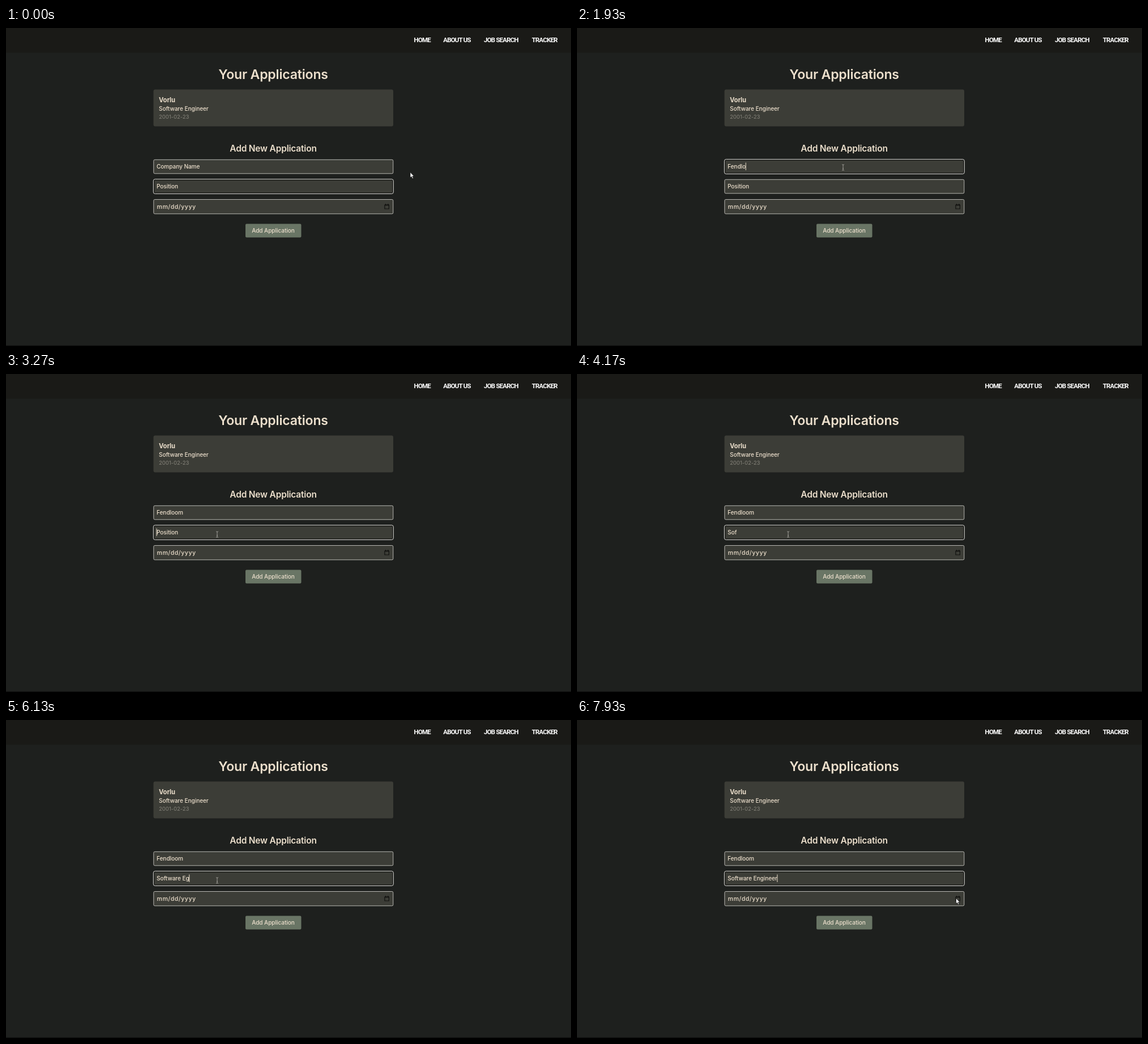
An HTML page that plays this animation: 998 by 561 pixels, repeating every 8000 ms.

```html
<!DOCTYPE html>
<html lang="en">
<head>
<meta charset="utf-8">
<title>Your Applications</title>
<style>
  html, body { margin: 0; width: 100%; height: 100%; overflow: hidden; background: #1e201e; }
  svg { display: block; width: 998px; height: 561px; }
  text { font: 500 10.1px Inter, "Open Sans", sans-serif; font-optical-sizing: none;
         letter-spacing: -.07px; fill: #ecdfcc; white-space: pre; }
  .nav text { font: 700 11.5px Roboto, sans-serif; letter-spacing: -.8px; fill: #fff; }
  .mid { text-anchor: middle; }
  .title { font-size: 23.1px; font-weight: 600; letter-spacing: -.2px; }
  .heading { font-size: 15.5px; font-weight: 600; letter-spacing: -.2px; }
  .name { font-size: 11.2px; font-weight: 700; }
  .day { font-size: 9.6px; font-weight: 400; fill: #85837a; }
  .date { font-size: 10.6px; letter-spacing: .5px; }
  .field { fill: #3c3d37; stroke: #b9b8b3; }
  .ring { fill: #171816; stroke: #dddcd8; }
  .inner { fill: #3c3d37; }
</style>
</head>
<body>
<svg viewBox="0 0 998 561">
  <rect width="998" height="561" fill="#1e201e"/>
  <rect width="998" height="43.5" fill="#1a1a17"/>
  <rect y="560" width="998" height="1" fill="#0b0c0b"/>
  <g class="nav mid">
    <text x="735.3" y="24.6">HOME</text>
    <text x="796.5" y="24.6">ABOUT US</text>
    <text x="874.5" y="24.6">JOB SEARCH</text>
    <text x="951.3" y="24.6">TRACKER</text>
  </g>
  <text class="title mid" x="472" y="90">Your Applications</text>
  <rect x="260.5" y="108.5" width="423.5" height="65" rx="3" fill="#3c3d37"/>
  <text class="name" x="270" y="130.7">Vorlu</text>
  <text x="270" y="145.6">Software Engineer</text>
  <text class="day" x="270" y="159.8">2001-02-23</text>
  <text class="heading mid" x="472" y="217.6">Add New Application</text>

  <rect class="field" x="260.8" y="232.3" width="423" height="24.5" rx="2"/>
  <rect class="field" x="260.8" y="267.3" width="423" height="24.5" rx="2"/>
  <rect class="field" x="260.8" y="302.5" width="423" height="25.3" rx="2"/>
  <g id="focus">
    <rect class="ring" x="260.3" y="231.7" width="424" height="25.7" rx="3"/>
    <rect class="inner" x="262.3" y="233.7" width="420" height="21.7" rx="1"/>
  </g>
  <text id="company" x="266" y="247.7"></text>
  <text id="position" x="266" y="282.7"></text>
  <text class="date" x="266.5" y="318.5">mm/dd/yyyy</text>
  <path d="M669 312h7.4v7h-7.4zM669 312.7h7.4M670.6 310v2M674.8 310v2" fill="none" stroke="#10110f" stroke-width="1.2"/>
  <rect id="caret" width="1" height="13.5" fill="#ecdfcc"/>

  <rect x="423" y="345.5" width="98.5" height="24" rx="2" fill="#697565"/>
  <text class="mid" x="472" y="360.6">Add Application</text>

  <path id="arrow" d="M0 0V9.6L2.2 7.6 3.9 11.3 5.5 10.6 3.8 7.1H6.8Z" fill="#fff" stroke="#111" stroke-width=".7"/>
  <path id="beam" d="M-2-5.2Q0-5.2 0-4Q0-5.2 2-5.2M0-4V4M-2 5.2Q0 5.2 0 4Q0 5.2 2 5.2M-1 1.8H1" fill="none" stroke="#b4b2ab" stroke-width=".8"/>
</svg>
<script>
const LOOP = 8000;
const $ = id => document.getElementById(id);

// Keystrokes as [time, key]; "<" deletes the last letter.
const companyKeys = [[1070, "F"], [1170, "e"], [1300, "n"], [1630, "d"],
  [1770, "l"], [1900, "o"], [2030, "o"], [2170, "m"]];
const positionKeys = [[3670, "S"], [3730, "o"], [3830, "f"], [4270, "t"], [4370, "w"],
  [4430, "a"], [4530, "r"], [4670, "e"], [4730, " "], [5000, "E"], [5270, "g"], [5330, "n"],
  [5470, "i"], [6030, "<"], [6130, "<"], [6230, "<"], [6400, "n"], [6570, "g"], [6670, "i"],
  [6830, "n"], [6930, "e"], [7030, "e"], [7170, "r"]];

const focusFirst = [270, 3000];
const caretOff = [[0, 270], [730, 1070], [2500, 2770], [3400, 3670], [4170, 4270], [5800, 6030]];

// Pointer stops as [time, x, y].
const stops = [[0, 714, 254.5], [30, 714, 254.5], [380, 470, 246], [2640, 470, 246],
  [2800, 378.5, 302], [3060, 373, 283], [7300, 373, 283], [7900, 669.5, 314.5], [LOOP, 669.5, 314.5]];

const within = (t, [from, to]) => t >= from && t < to;

function typed(keys, t) {
  return keys.filter(([at]) => at <= t)
    .reduce((s, [, key]) => key === "<" ? s.slice(0, -1) : s + key, "");
}

function pointer(t) {
  const i = stops.findIndex(([at]) => at > t);
  const [t0, x0, y0] = stops[i - 1], [t1, x1, y1] = stops[i];
  const u = (t - t0) / (t1 - t0), k = u * u * (3 - 2 * u);
  return [x0 + (x1 - x0) * k, y0 + (y1 - y0) * k];
}

function setText(node, value) {
  if (node.textContent !== value) node.textContent = value;
}

function show(node, visible) {
  node.style.display = visible ? "" : "none";
}

function draw(t) {
  const company = typed(companyKeys, t), position = typed(positionKeys, t);
  setText($("company"), company || "Company Name");
  setText($("position"), position || "Position");

  const first = within(t, focusFirst), offset = first ? 0 : 35;
  $("focus").setAttribute("transform", `translate(0 ${offset})`);
  const value = first ? company : position;
  const width = value ? $(first ? "company" : "position").getComputedTextLength() : 0;
  $("caret").setAttribute("x", 265.6 + width);
  $("caret").setAttribute("y", 237.5 + offset);
  show($("caret"), !caretOff.some(span => within(t, span)));

  const [x, y] = pointer(t);
  const overText = x > 260 && x < 685 && (within(y, [232, 258]) || within(y, [267, 293]));
  for (const id of ["arrow", "beam"]) {
    $(id).setAttribute("transform", `translate(${x} ${y})`);
    show($(id), overText === (id === "beam"));
  }
}

const start = performance.now();
function tick() {
  draw((performance.now() - start) % LOOP);
  requestAnimationFrame(tick);
}
tick();
</script>
</body>
</html>
```
